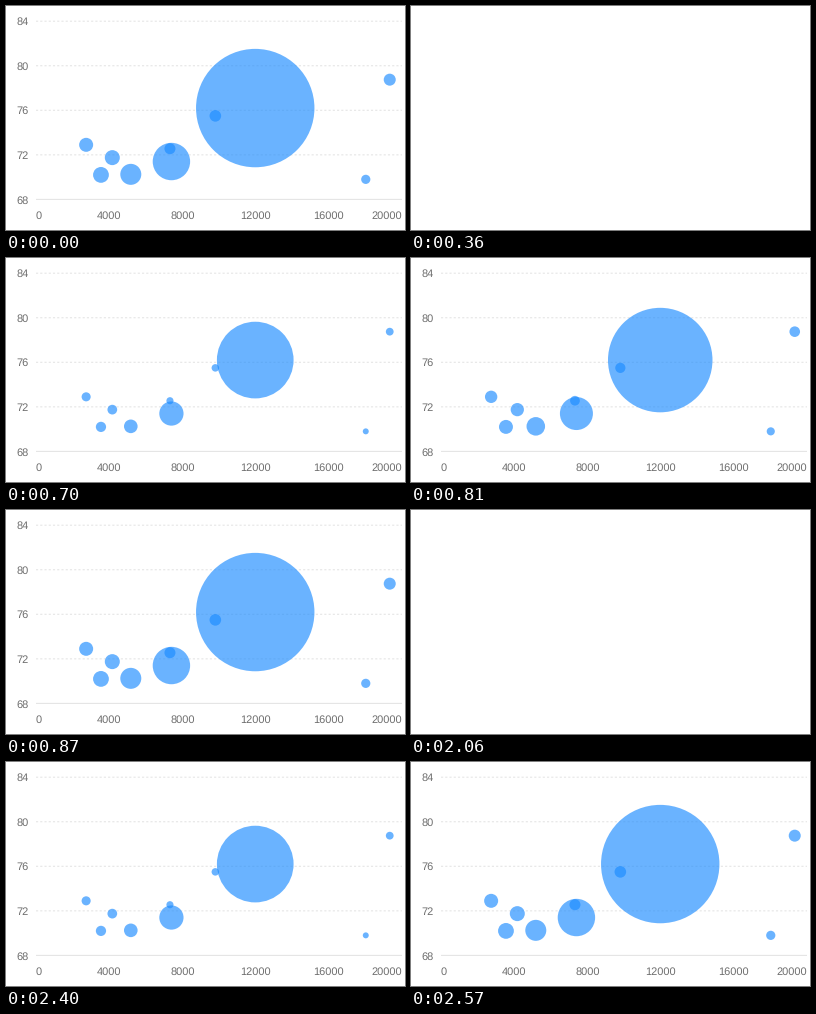
These frames come from a looping animation (399 px wide and 224 px high, 3930 ms). A matplotlib script:

```python
import math

import matplotlib.pyplot as plt
from matplotlib.animation import FuncAnimation
from matplotlib.patches import Circle

WIDTH, HEIGHT, DPI = 399, 224, 64
LOOP_MS, STEP_MS = 3930, 10
TICK_MS = 1000 / 18  # the chart redraws at 18 fps while growing
GROW_MS = 473
REPLAYS = [(360, 480, 870), (2060, 2120, 2570)]  # cleared, redrawn, settled
LEFT, RIGHT, TOP, BOTTOM = 30, 396, 15.2, 193.4
PX = 72 / DPI  # points per pixel

# income, life expectancy, full radius
DATA = [
    (2740, 72.9, 7), (3550, 70.2, 7.9), (4170, 71.75, 7.5),
    (5180, 70.25, 10.5), (7400, 71.4, 18.7), (7320, 72.55, 5.5),
    (9800, 75.5, 5.8), (11980, 76.2, 59.2), (19330, 78.75, 6),
    (18020, 69.8, 4.6),
]

plt.rcParams.update({"font.family": "Liberation Sans", "text.hinting": "none",
                     "text.hinting_factor": 1})
fig = plt.figure(figsize=(WIDTH / DPI, HEIGHT / DPI), dpi=DPI, facecolor="white")
ax = fig.add_axes([0, 0, 1, 1])
ax.set(xlim=(0, WIDTH), ylim=(HEIGHT, 0))
ax.axis("off")


def x_of(income):
    return LEFT + income / 20000 * (RIGHT - LEFT)


def y_of(life):
    return BOTTOM + (life - 68) / 16 * (TOP - BOTTOM)


def label(x, baseline, value, align):
    return ax.text(x, baseline, str(value), ha=align, va="baseline",
                   fontsize=10.9 * PX, color="#6e6e6e")


def rule(y, style):
    return ax.plot([LEFT, RIGHT], [y, y], color="#e4e4e4", lw=1.06 * PX, ls=style,
                   dash_capstyle="butt", solid_capstyle="butt",
                   snap=False, zorder=1)[0]


parts = []
for life in range(68, 85, 4):
    parts.append(label(22.3, y_of(life) + 4, life, "right"))
    parts.append(rule(y_of(life), "-" if life == 68 else (0, (2, 2))))

for income in range(0, 20001, 4000):
    align = {0: "left", 20000: "right"}.get(income, "center")
    parts.append(label(x_of(income), 212.6, income, align))

circles = [Circle((x_of(income), y_of(life)), r, fc="#1b8bff", ec="none",
                  lw=0, alpha=0.65, zorder=2) for income, life, r in DATA]
for circle in circles:
    ax.add_patch(circle)
parts += circles


def growth(now):
    """Bubble scale at a time in ms; zero means the chart is blank."""
    for cleared, redrawn, settled in REPLAYS:
        if cleared <= now < redrawn:
            return 0
        if redrawn <= now < settled:
            ticks_left = math.ceil((settled - now - 6) / TICK_MS)
            return max(0.01, 1 - ticks_left * TICK_MS / GROW_MS)
    return 1


def update(frame):
    scale = growth(frame * STEP_MS)
    for part in parts:
        part.set_visible(scale > 0)
    for circle, (_, _, radius) in zip(circles, DATA):
        circle.set_radius(radius * scale)
    return parts


anim = FuncAnimation(fig, update, frames=LOOP_MS // STEP_MS, interval=STEP_MS,
                     repeat=True, repeat_delay=0, blit=False)
plt.show()
```
